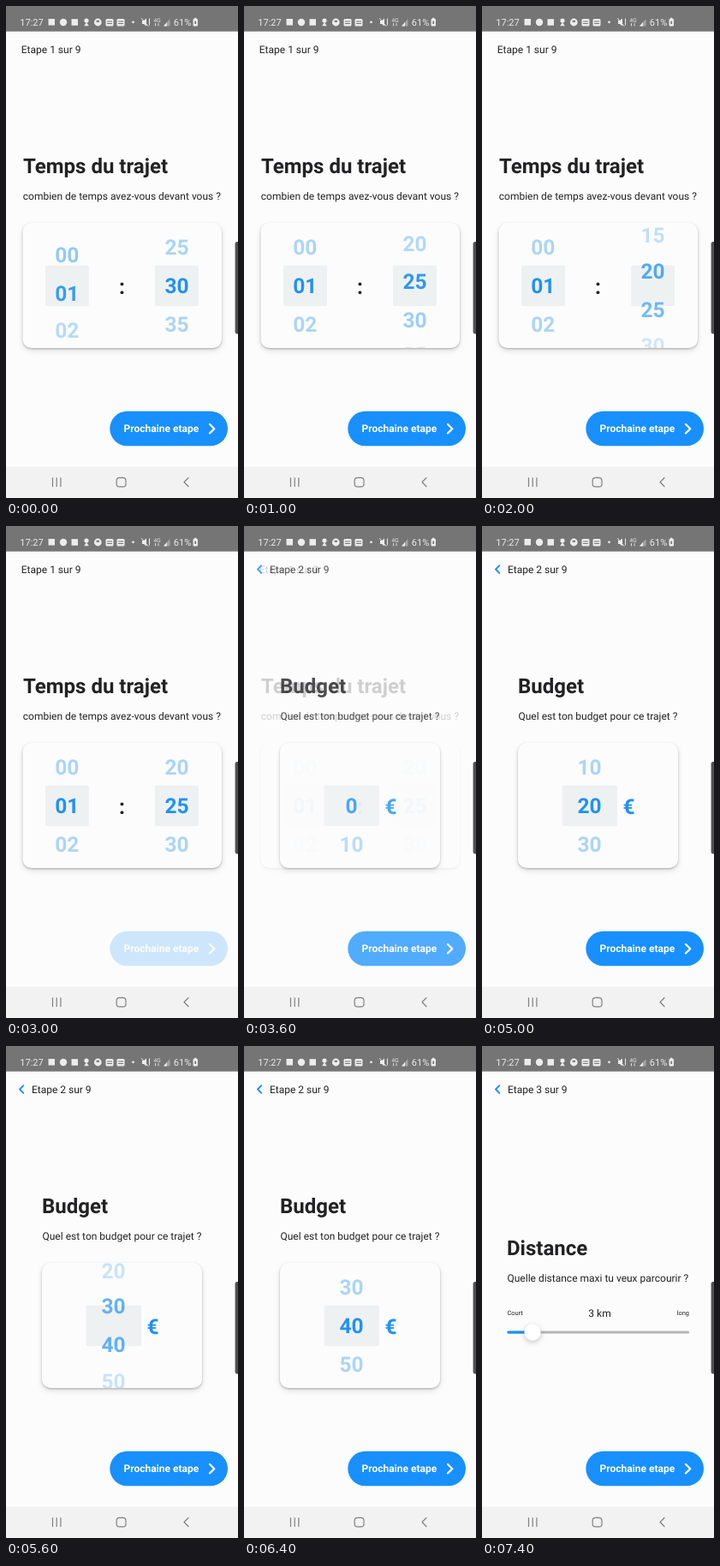
Write an HTML page that moves like this. It is 271 px wide and 574 px high and loops after 8000 ms.

```html
<!DOCTYPE html>
<html lang="fr">
<head>
<meta charset="utf-8">
<title>Trajet</title>
<style>
  html, body { margin: 0; width: 100%; height: 100%; overflow: hidden; background: #fcfcfc; }
  svg { display: block; width: 100vw; height: 100vh; font: 12px Roboto, sans-serif; fill: #222224; text-rendering: geometricPrecision; }
  .title { font-size: 24px; font-weight: 700; }
  .wheel { font-size: 24.5px; font-weight: 700; text-anchor: middle; }
  .blue { fill: #1f92f3; }
  .small { font-size: 7.4px; }
  .bold { font-weight: 700; }
  .status { font-size: 11px; fill: #ececec; }
  .line { fill: none; stroke-linecap: round; stroke-linejoin: round; }
  .card { fill: #fcfcfc; filter: drop-shadow(0 1px 1.3px rgba(0,0,0,.26)) drop-shadow(0 3px 3px rgba(0,0,0,.11)); }
  .slot { fill: #eef1f2; }
  .knob { fill: #fff; filter: drop-shadow(0 2px 3px rgba(0,0,0,.22)); }
  .hole { fill: #757575; }
</style>
</head>
<body>
<svg viewBox="0 0 271 574" preserveAspectRatio="none">
  <defs>
    <clipPath id="window"><rect x="19" y="253" width="233" height="146" rx="10"/></clipPath>
    <path id="back" class="line" d="M20.3 46.2L16 50.5L20.3 54.8" stroke="#1890ff" stroke-width="1.9"/>
  </defs>
  <rect width="271" height="574" fill="#fcfcfc"/>

  <g id="time">
    <text x="17.8" y="55">Etape 1 sur 9</text>
    <text class="title" x="20" y="195">Temps du trajet</text>
    <text x="19.8" y="226">combien de temps avez-vous devant vous ?</text>
    <rect class="card" x="19.5" y="253" width="232.5" height="146" rx="10"/>
    <rect class="slot" x="46" y="302.5" width="51" height="47.5" rx="2"/>
    <rect class="slot" x="174" y="302.5" width="51" height="47.5" rx="2"/>
    <text class="wheel" x="135.5" y="335.5">:</text>
    <g id="hours" class="wheel blue" clip-path="url(#window)"></g>
    <g id="minutes" class="wheel blue" clip-path="url(#window)"></g>
  </g>

  <g id="budget">
    <use href="#back"/>
    <text x="29.9" y="55">Etape 2 sur 9</text>
    <text class="title" x="42" y="195">Budget</text>
    <text x="42.5" y="226">Quel est ton budget pour ce trajet ?</text>
    <rect class="card" x="42" y="253" width="187" height="146" rx="10"/>
    <rect class="slot" x="93.5" y="302.5" width="64.5" height="47.5" rx="2"/>
    <text class="wheel blue" x="171.5" y="335.7">€</text>
    <g id="euros" class="wheel blue" clip-path="url(#window)"></g>
  </g>

  <g id="distance">
    <use href="#back"/>
    <text x="29.9" y="55">Etape 3 sur 9</text>
    <text class="title" x="29" y="244">Distance</text>
    <text x="29.5" y="275">Quelle distance maxi tu veux parcourir ?</text>
    <text class="small" x="29.5" y="314">Court</text>
    <text x="137.5" y="315.5" text-anchor="middle">3 km</text>
    <text class="small" x="242" y="314" text-anchor="end">long</text>
    <rect x="29.5" y="332.6" width="212.5" height="3" rx="1" fill="#b5b5b5"/>
    <rect x="29.5" y="332.6" width="29" height="3" rx="1" fill="#1890ff"/>
    <circle class="knob" cx="59" cy="334" r="9.7"/>
  </g>

  <g id="next">
    <rect x="121.3" y="472.8" width="137.7" height="40.5" rx="20.25" fill="#1890ff"/>
    <text class="bold" x="137.5" y="497.3" fill="#fff">Prochaine etape</text>
    <path class="line" d="M238 488L243.3 493.2L238 498.4" stroke="#fff" stroke-width="2.2"/>
  </g>

  <g class="status">
    <rect width="271" height="29.7" class="hole"/>
    <text x="16.3" y="22.8">17:27</text>
    <rect x="49.5" y="15" width="7.5" height="7.5"/>
    <circle cx="67" cy="19" r="4.2"/>
    <rect x="76.5" y="15.2" width="7.5" height="7.5"/>
    <circle cx="94" cy="17" r="2.6"/>
    <path d="M91.2 23.3L94 19L96.8 23.3Z"/>
    <circle cx="107.3" cy="19" r="4.4"/>
    <rect x="105.6" y="16.8" width="3.4" height="2" class="hole"/>
    <g id="boxes"></g>
    <circle cx="148.5" cy="18.8" r="1.4"/>
    <path d="M159 17h2l3-2.5v9L161 21h-2z"/>
    <path class="line" d="M158.5 14.5L166 23.5M167.5 15V22" stroke="#ececec"/>
    <text x="172.5" y="19" font-size="6.5">4G</text>
    <path class="line" d="M174.5 20.5V23M178 20.5V23" stroke="#ececec" stroke-width=".9"/>
    <path d="M184 23.5L191.5 15V23.5Z" opacity=".4"/>
    <path d="M184 23.5L188 19V23.5Z"/>
    <text x="195.8" y="22.8">61%</text>
    <rect x="218.5" y="15" width="5.5" height="8.5" rx="1"/>
    <rect x="220" y="13.8" width="2.5" height="2"/>
    <rect x="220.4" y="17.6" width="1.7" height="3.4" class="hole"/>
  </g>

  <rect y="537.5" width="271" height="36.5" fill="#f2f2f2"/>
  <g class="line" stroke="#808080" stroke-width="1.2">
    <path d="M54.5 550.5V560.5M59.2 550.5V560.5M63.9 550.5V560.5"/>
    <rect x="129.2" y="550.3" width="10.8" height="10.6" rx="3.2"/>
    <path d="M213 550.5L208 555.5L213 560.5"/>
  </g>
  <rect x="267.6" y="275" width="8" height="107.5" rx="2.5" fill="#505050"/>
</svg>
<script>
const LOOP = 8000, TICK = 200, ROW = 45, MID = 335.4;
const el = id => document.getElementById(id);
const make = (parent, tag, attrs, text = '') => {
  const node = document.createElementNS('http://www.w3.org/2000/svg', tag);
  for (const k in attrs) node.setAttribute(k, attrs[k]);
  node.textContent = text;
  return parent.appendChild(node);
};

for (const x of [116.5, 129.5]) {
  make(el('boxes'), 'rect', { x, y: 15, width: 9, height: 8.5, rx: 1.5 });
  make(el('boxes'), 'path', { d: `M${x + 1.5} 18H${x + 7.5}M${x + 1.5} 20.5H${x + 7.5}`, stroke: '#757575' });
}

function wheel(id, x, count, label) {
  const rows = Array.from({ length: count }, (_, i) => make(el(id), 'text', { x }, label(i)));
  return pos => rows.forEach((row, i) => {
    const d = i - pos, a = Math.abs(d);
    // rows past the neighbours bunch up slightly
    const y = MID + ROW * d - Math.sign(d) * 6 * Math.max(0, a - 1);
    row.setAttribute('y', y.toFixed(2));
    row.setAttribute('opacity', a > 2 ? 0 : a < 1 ? 1 - .64 * a : .36 - .26 * (a - 1));
  });
}
const pad = n => String(n).padStart(2, '0');
const hours = wheel('hours', 71.2, 24, pad);
const minutes = wheel('minutes', 199.5, 12, i => pad(i * 5));
const euros = wheel('euros', 125.6, 11, i => i * 10);

// one value per tick from `start`; the last one holds
const run = (t, start, before, values) =>
  t < start ? before : values[Math.min(values.length - 1, (t - start) / TICK)];

const show = (id, opacity) => el(id).setAttribute('opacity', opacity);

function draw(now) {
  const t = Math.floor(now % LOOP / TICK) * TICK;
  hours(run(t, 0, 1, [.82, .95, 1]));
  minutes(run(t, 1000, 6, [5.11, 4.5, 4.12, 4, 4.08, 4.38, 4.85, 5]));
  euros(run(t, 4400, 0, [.89, 1.5, 1.85, 2, 2.4, 3, 3.51, 3.8, 3.93, 3.98, 4]));

  const second = run(t, 3400, 0, [.3, .8, 1]);
  const third = t >= 7400 ? 1 : 0;
  show('time', 1 - second);
  show('budget', second * (1 - third));
  show('distance', third);
  show('next', t < 7200 ? run(t, 2800, 1, [.6, .2, .2, .3, .75, 1]) : run(t, 7200, 1, [.5, 1]));
  requestAnimationFrame(draw);
}
draw(performance.now());
</script>
</body>
</html>
```
